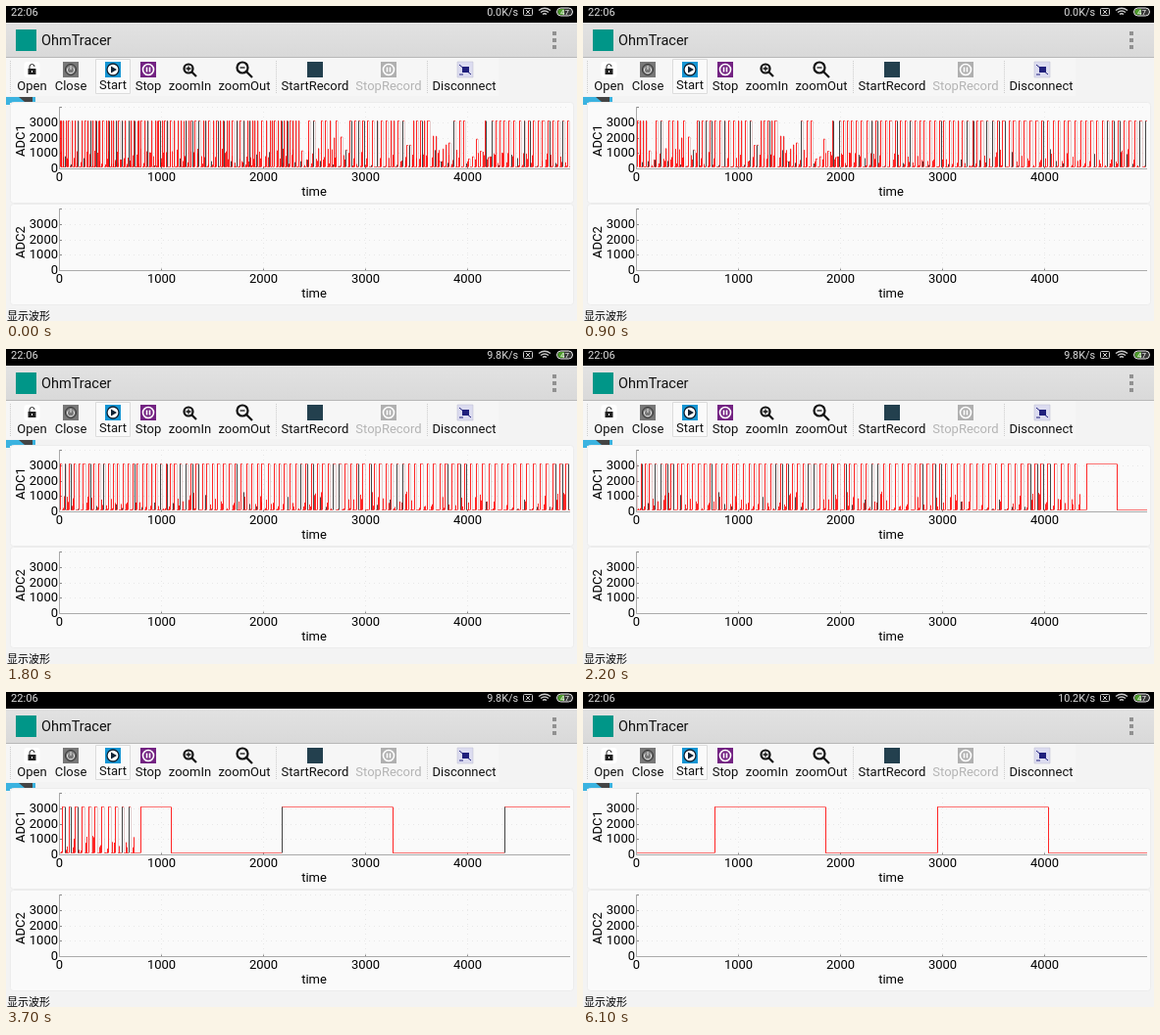
Write an HTML page that moves like this. It is 582 px wide and 322 px high and loops after 6200 ms.

```html
<!DOCTYPE html>
<html>
<head>
<meta charset="utf-8">
<style>
html, body { margin: 0; width: 100%; height: 100%; overflow: hidden; background: #f3f3f3 }
svg { display: block; font: 13px Roboto, sans-serif }
.mid { text-anchor: middle }
.small { font-size: 10.8px; fill: #ddd }
.line { fill: none; stroke-width: 1 }
</style>
</head>
<body>
<svg id="stage" width="582" height="322" viewBox="0 0 582 322">
  <defs>
    <linearGradient id="bar" x2="0" y2="1"><stop stop-color="#e2e2e2"/><stop offset="1" stop-color="#d9d9d9"/></linearGradient>
    <clipPath id="plot"><path d="M55 100H575V166H55Z"/></clipPath>
    <g id="pause"><circle r="5.500" fill="none" stroke="#fff" stroke-width="1.6"/><path d="M-1.5-2.500v5M1.5-2.500v5" stroke="#fff" stroke-width="1.6"/></g>
  </defs>

  <path d="M0 0H582V17H0Z"/>
  <text class="small" x="5" y="10" style="font-size:11.2px">22:06</text>
  <text class="small" x="522" y="10" text-anchor="end" id="rate"></text>
  <g fill="none" stroke="#ccc">
    <rect x="527.5" y="2.5" width="9" height="7" rx="1"/><path d="M530 4l4 4m0-4l-4 4"/>
    <path d="M543 4.500q6-4.500 12 0M545 6.500q4-3 8 0M547 8.500q2-1.500 4 0" stroke-width="1.4"/>
    <rect x="561.5" y="2" width="16" height="8" rx="4" fill="#333" stroke="#eee"/>
    <path d="M569 3h-3.500a3 3 0 0 0 0 6h3.500z" fill="#4c9a2a" stroke="none"/>
  </g>
  <text class="mid" x="569.500" y="9" font-size="8" fill="#fff">47</text>

  <path d="M0 17H582V52H0Z" fill="url(#bar)"/>
  <path d="M0 52.500H582" stroke="#b8b8b8"/>
  <path d="M10 24h21v22h-21z" fill="#009688"/>
  <text x="36" y="40" font-size="14.500" fill="#111">OhmTracer</text>
  <path d="M557 26h4v4h-4zm0 7h4v4h-4zm0 7h4v4h-4z" fill="#919191"/>

  <path d="M0 53H502V92H0Z" fill="#f6f6f6"/>
  <path d="M91.500 54.500H126.500V89.500H91.500Z" fill="#fafafa" stroke="#dcdcdc"/>
  <path d="M4.500 56V89M275.500 56V89M429.500 56V89" stroke="#ccc" stroke-dasharray="1 1"/>
  <g id="tools" class="mid"></g>
  <g transform="translate(26.500 65)"><rect x="-8" y="-8" width="16" height="16" rx="3" fill="#fff"/><path d="M-4-1H4V5H-4Z" fill="#222"/><path d="M-2.500-1v-2a2.500 2.500 0 0 1 5 0" class="line" stroke="#222"/><path d="M0 1v2" stroke="#fff"/></g>
  <g transform="translate(66 65)"><path d="M-8-8H8V8H-8Z" fill="#777"/><circle r="5.500" class="line" stroke="#333"/><path d="M-2-2.500a3.500 3.500 0 1 0 4 0M0-4v4" class="line" stroke="#eee"/></g>
  <g transform="translate(109 65)"><path d="M-8-8H8V8H-8Z" fill="#1495d4"/><circle r="6" fill="#fff" stroke="#123" stroke-width="1.300"/><path d="M-2-3.500L4 0L-2 3.500Z" fill="#123"/></g>
  <g transform="translate(145 65)"><path d="M-8-8H8V8H-8Z" fill="#732282"/><use href="#pause"/></g>
  <g fill="none" stroke="#111" stroke-width="2.200"><circle cx="186" cy="64" r="4.500"/><path d="M189.500 67.500l4.500 4.500"/><path d="M183.500 64h5m-2.500-2.500v5" stroke-width="1.300"/>
    <circle cx="241" cy="63" r="5.500"/><path d="M245 67l6 6"/><path d="M238.500 63h5" stroke-width="1.300"/></g>
  <path d="M307 57h16v16h-16z" fill="#23404e"/>
  <g transform="translate(390 65)"><path d="M-8-8H8V8H-8Z" fill="#b0b0b0"/><use href="#pause"/></g>
  <g transform="translate(468 65)"><path d="M-8-8H8V8H-8Z" fill="#dcdcf0" stroke="#bbc" stroke-width=".5"/><path d="M-3-3H4V3H-3Z" fill="#20207c"/><path d="M-6-5L6 5M-6 5h4" class="line" stroke="#20207c"/></g>

  <path d="M0 93H30V99H4V101H0Z" fill="#3bb3e0"/>
  <path d="M13 93H27V98H19Z" fill="#444"/>
  <g id="charts"></g>
  <g clip-path="url(#plot)" class="line">
    <path id="flat" stroke="#f00" stroke-opacity=".55"/>
    <path id="pale" stroke="#b66" stroke-opacity=".3"/>
    <path id="red" stroke="#f00" stroke-opacity=".85"/>
    <path id="dark" stroke="#444"/>
  </g>
  <text x="1" y="321" style="font:11px 'Noto Sans CJK SC','Noto Sans CJK',sans-serif">显示波形</text>
</svg>
<script>
const el = id => document.getElementById(id);
const LOOP = 6200, LOW = 164.5, HIGH = 117.5;

const tools = [['Open', 26.5], ['Close', 66], ['Start', 109, 85], ['Stop', 145], ['zoomIn', 187.5],
  ['zoomOut', 243], ['StartRecord', 315], ['StopRecord', 390], ['Disconnect', 467]];
el('tools').innerHTML = tools.map(([name, x, y = 86]) =>
  `<text x="${x}" y="${y}" fill="${name === 'StopRecord' ? '#b4b4b4' : '#111'}">${name}</text>`).join('');

function chart(name, top) {
  let svg = `<rect x="4.5" y="${top + .5}" width="574" height="103" rx="3" fill="#fafafa" stroke="#ececec"/>`;
  const zero = top + 68.5;
  for (let i = 0; i < 5; i++) {
    const x = 54.5 + i * 104, y = zero - Math.round(i * 15.7);
    svg += `<path d="M55 ${y}H574M${x} ${top + 5}V${zero}" stroke="#e8e8e8" stroke-dasharray="1 4"/>
      <path d="M55 ${y}h2M${x} ${zero - 2}v2" stroke="#888"/>
      <text class="mid" x="${x}" y="${top + 81}">${i * 1000}</text>`;
    if (i < 4) svg += `<text x="53" y="${y + 3.5}" text-anchor="end">${i * 1000}</text>`;
  }
  return svg + `<path d="M54.5 ${top + 5}V${zero}H575" class="line" stroke="#aaa"/>
    <text class="mid" x="314" y="${top + 96}">time</text>
    <text class="mid" transform="translate(18.5 ${top + 39.5}) rotate(-90)">${name}</text>`;
}
el('charts').innerHTML = chart('ADC1', 98) + chart('ADC2', 202);

// Pulses along the recorded signal: start, end, relative height.
let seed = 7;
const random = () => (seed = seed * 16807 % 2147483647) / 2147483647;
const pulses = [];
for (let u = 55; u < 1079;) {
  const jitter = (random() - .5) * (1 - u / 1085);
  const pitch = (2.4 + u / 240) * (1 + jitter);
  const weak = (u > 290 && u < 350) || (u > 390 && u < 495);
  pulses.push([u, u + pitch * .4, weak && random() < .6 ? .1 + random() * .6 : 1]);
  for (const part of [.6, .8]) pulses.push([u + pitch * part, u + pitch * part, random() ** 2 * .4]);
  u += pitch;
}
pulses.push([1085, 1116, 1]);
for (let u = 1229; u < 2150; u += 226.6) pulses.push([u, u + 113.3, 1]);

const scroll = n => n < 30 ? 26 * n : n < 46 ? 780 + 24 * (n - 30) : 1164 + 25.6 * (n - 46);

function draw() {
  const step = Math.floor(performance.now() % LOOP / 100), shift = scroll(step);
  const paths = { flat: '', pale: '', red: '', dark: '' };
  let last = 0;
  const edge = (x, top, ink) => {
    paths[x % 13 % 7 === 1 ? 'dark' : ink] += `M${x + .5} ${LOW}V${top}`;
  };
  for (const [start, end, height] of pulses) {
    const a = Math.round(start - shift), b = Math.round(end - shift);
    if (b < 50) continue;
    if (a > 580) { paths.flat += `M${last} ${LOW}H580`; break; }
    const top = LOW + (HIGH - LOW) * height;
    paths.flat += `M${last} ${LOW}H${a}M${a} ${top}H${b}`;
    edge(a, top, 'red');
    // Fast pulses fade on their falling edge.
    if (b > a) edge(b, top, end - start < 9 ? 'pale' : 'red');
    last = b;
  }
  for (const id in paths) el(id).setAttribute('d', paths[id]);
  el('rate').textContent = step < 13 ? '0.0K/s' : step < 44 ? '9.8K/s' : '10.2K/s';
  requestAnimationFrame(draw);
}
draw();
</script>
</body>
</html>
```
